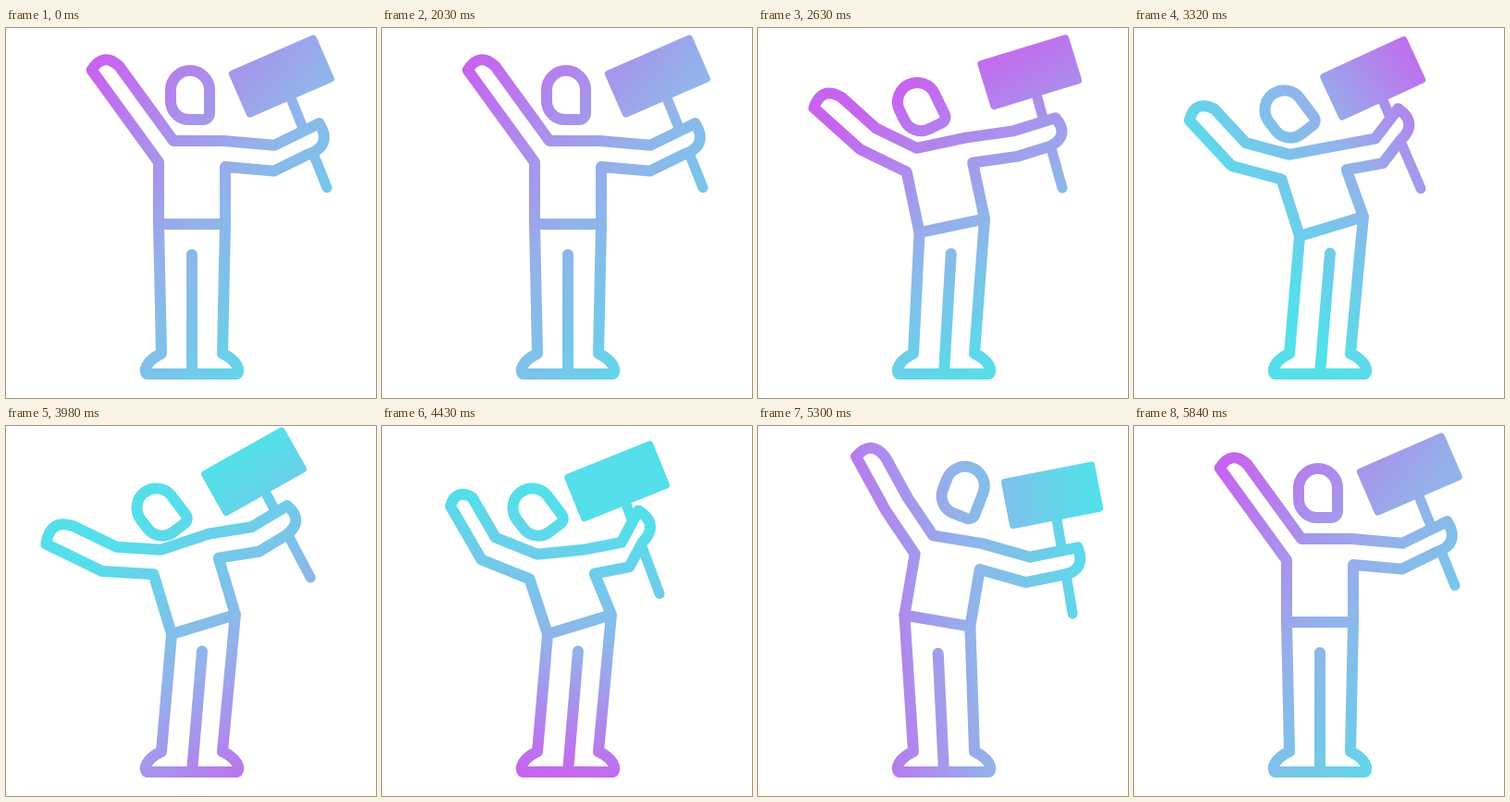
Write an HTML page with a canvas that moves like this. It is 400 by 400 pixels and loops after 5.87 s.

```html
<!DOCTYPE html>
<html lang="en">
<head>
<meta charset="utf-8">
<style>
  html, body { margin: 0; width: 100%; height: 100%; overflow: hidden; background: #fff; }
  canvas { display: block; }
</style>
</head>
<body>
<canvas id="stage" width="400" height="400"></canvas>
<script>
const ctx = document.getElementById('stage').getContext('2d');
const LOOP = 5870, WAVE = 930;

// Lean, left upper arm and forearm angles, right ones, right reach, sign angle, shoulder drop
const rest = [0, 234, 234, 5, -26, 1.15, -23.5, 0];
const back = [-1.05, 252, 252, 23, -8, 1.15, -5.5, 0];
const reach = [0.7, 206, 222, -8, -17, 1.05, -17, 0];
const low = [1, 183.5, 206, -9, -31, 0.96, -29.4, -2];
const high = [1, 202, 240, -11, -62, 0.83, -22, 15];

const poses = [[2030, rest], [2330, back], [2630, reach]];
for (let i = 0; i < 5; i++) poses.push([3050 + i * WAVE / 2, i % 2 ? high : low]);
poses.push([5480, back], [5810, rest]);

// The purple end of the gradient circles the figure; the cyan end stays opposite
const shades = [[2030, [80, 65, 370, 305]], [2630, [170, 60, 319, 337]],
  [3320, [315, 10, 87, 179]], [3980, [273, 408, 93, 148]],
  [4910, [80, 305, 370, 65]], [5840, [80, 65, 370, 305]]];

// Monotone cubic interpolation through timed keys
function sample(keys, t) {
  const last = keys.length - 1;
  if (t <= keys[0][0]) return keys[0][1];
  if (t >= keys[last][0]) return keys[last][1];
  const k = keys.findIndex(key => key[0] > t) - 1;
  const span = keys[k + 1][0] - keys[k][0], u = (t - keys[k][0]) / span;
  return keys[k][1].map((p, i) => {
    const q = keys[k + 1][1][i];
    const slope = j => (keys[j + 1][1][i] - keys[j][1][i]) / (keys[j + 1][0] - keys[j][0]);
    const tangent = j => {
      if (j === 0 || j === last) return 0;
      const a = slope(j - 1), b = slope(j);
      return a * b > 0 ? 2 * a * b / (a + b) : 0;
    };
    const e = u * u * (3 - 2 * u), v = 1 - u;
    return p + (q - p) * e + span * u * v * (v * tangent(k) - u * tangent(k + 1));
  });
}

function gradientAt(t) {
  const g = ctx.createLinearGradient(...sample(shades, t));
  ['#c764ef', '#93b2ea', '#55dfea'].forEach((color, i) => g.addColorStop(i / 2, color));
  return g;
}

// Point (x, y) turned by deg and moved to an origin
function turn([ox, oy], x, y, deg) {
  const c = Math.cos(deg * Math.PI / 180), s = Math.sin(deg * Math.PI / 180);
  return [ox + x * c - y * s, oy + x * s + y * c];
}

function placed(path, [x, y], deg) {
  const out = new Path2D();
  out.addPath(path, new DOMMatrix().translate(x, y).rotate(deg));
  return out;
}

const board = new Path2D();
board.roundRect(-51.5, -27.5, 103, 55, 4);
const stick = new Path2D('M0 20L-3 130');
const skull = new Path2D();
skull.roundRect(-21, -26.5, 42, 53, [21, 21, 7, 20]);

// One edge of an arm: elbow and hand
function limb(shoulder, upper, fore, angle, foreAngle) {
  const elbow = turn(shoulder, upper, 0, angle);
  return [elbow, turn(elbow, fore, 0, foreAngle)];
}

function draw(t) {
  const [lean, left, leftFore, right, rightFore, stretch, signTurn, drop] = sample(poses, t);
  const tilt = -17 * lean, headTurn = -37 * lean;
  const waist = [201 + 12.5 * lean, 212 + 2.5 * lean];
  const torso = (x, y, sink = 0) => turn([waist[0], waist[1] + sink], x, y, tilt);

  const hipL = torso(-36, 0), hipR = torso(36, 0);
  const pitL = torso(-36, -67, drop * 0.3), neckL = torso(-20, -90, drop * 0.3);
  const pitR = torso(36, -62, drop), neckR = torso(34, -90, drop);
  const [elbowLow, tipLow] = limb(pitL, 56, 67, left, leftFore);
  const [elbowTop, tipTop] = limb(neckL, 49, 50, left, leftFore);
  const [bendTop, handTop] = limb(neckR, 48 * stretch, 47 * stretch, right, rightFore);
  const [bendLow, handLow] = limb(pitR, 46 * stretch, 36 * stretch, right, rightFore);
  const grip = [(handTop[0] + handLow[0]) / 2, (handTop[1] + handLow[1]) / 2];
  const sign = turn(grip, -5, -66 * stretch, signTurn);
  const head = turn(torso(20, -112), -22, -27.5, headTurn);

  const body = new Path2D();
  const lines = (...points) => points.forEach(p => body.lineTo(...p));
  const hand = ([x, y], [X, Y]) =>
    body.quadraticCurveTo((x + X) / 2 + (Y - y) * 0.62, (y + Y) / 2 - (X - x) * 0.62, X, Y);
  lines(tipLow);
  hand(tipLow, tipTop);
  lines(elbowTop, neckL, neckR, bendTop, handTop);
  hand(handTop, handLow);
  lines(bendLow, pitR, hipR, hipL, pitL, elbowLow);
  body.closePath();

  const legs = new Path2D(`M${hipL}L168 352C151 360 149 370 152 374H250
    C253 370 251 360 234 352L${hipR}M${201 + 11 * lean} ${245 - 1.5 * lean}L201 374`);

  ctx.fillStyle = '#fff';
  ctx.fillRect(0, 0, 400, 400);
  ctx.lineCap = ctx.lineJoin = 'round';
  ctx.strokeStyle = ctx.fillStyle = gradientAt(t);
  ctx.lineWidth = 11;
  ctx.stroke(placed(stick, sign, signTurn));
  ctx.fill(placed(board, sign, signTurn));

  ctx.lineWidth = 12;
  ctx.fillStyle = '#fff';
  ctx.fill(body);
  [body, legs, placed(skull, head, headTurn)].forEach(path => ctx.stroke(path));
}

const start = performance.now();
function tick() {
  draw((performance.now() - start) % LOOP);
  requestAnimationFrame(tick);
}
tick();
</script>
</body>
</html>
```
